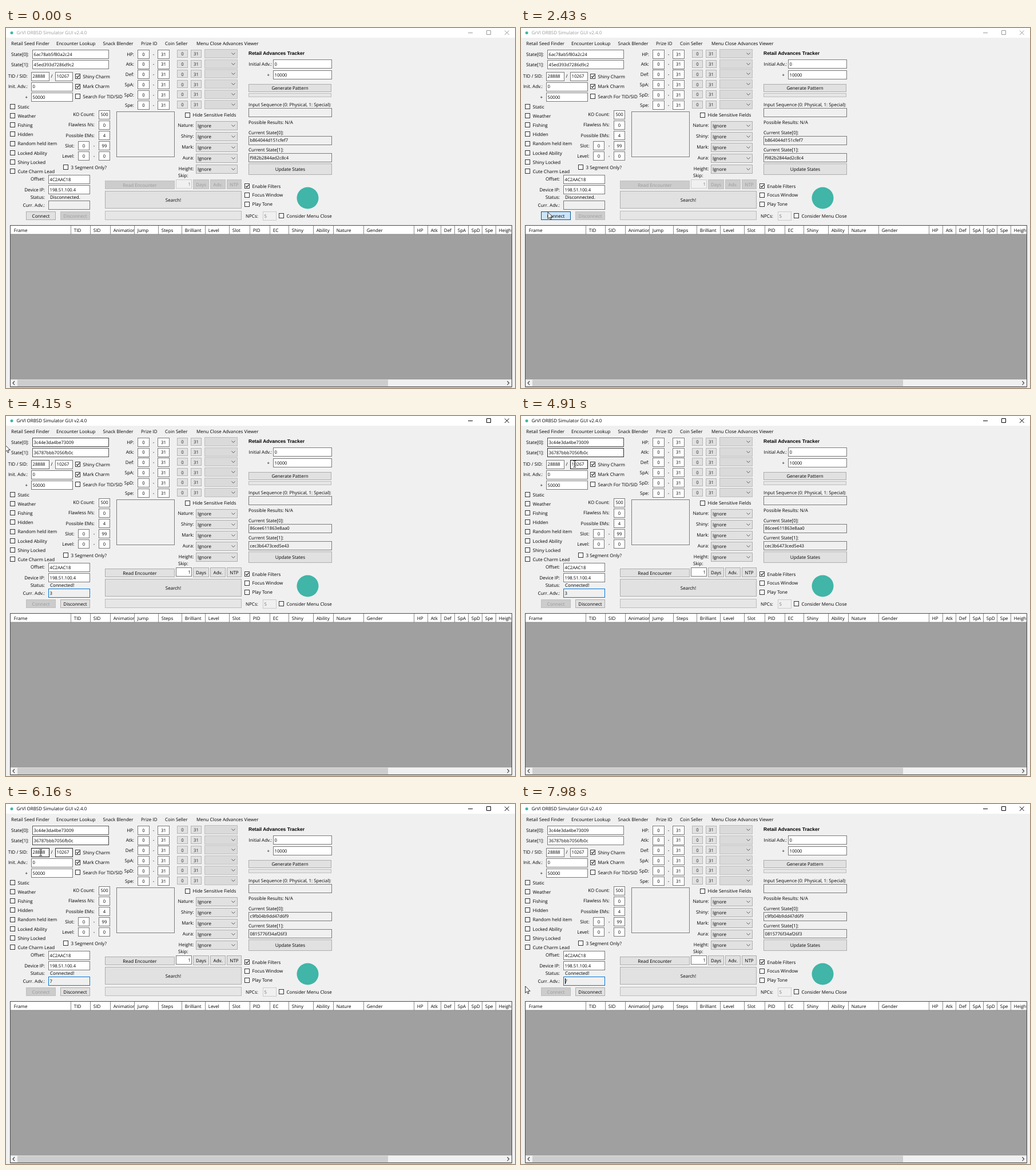
An HTML page that plays this animation: 890x630 px, repeating every 8 s.

```html
<!DOCTYPE html>
<html lang="en">
<head>
<meta charset="utf-8">
<title>Generator window</title>
<style>
  html, body { margin: 0; width: 100%; height: 100%; overflow: hidden; background: #f0f0f0; }
  svg { display: block; width: 890px; height: 630px; }
  text { font: 8px "Open Sans", "Noto Sans", sans-serif; text-rendering: geometricPrecision; white-space: pre; }
  .value { font-size: 7.7px; }
  .heading { font: bold 8.5px "Liberation Sans", sans-serif; }
</style>
</head>
<body>
<svg id="stage" viewBox="0 0 890 630"></svg>
<script>
const LOOP = 8000;
const PRESS = 2425, ACTIVE = 2460, LINKED = 2730;
const stage = document.getElementById('stage');
const hot = [];       // areas that react to the pointer
const editable = [];  // areas that show the I-beam
let layer = stage;

function add(tag, attrs, content) {
  const el = document.createElementNS('http://www.w3.org/2000/svg', tag);
  for (const key in attrs) el.setAttribute(key, attrs[key]);
  if (content !== undefined) el.textContent = content;
  layer.appendChild(el);
  return el;
}

function group(build) {
  const parent = layer, g = add('g', {});
  layer = g;
  build();
  layer = parent;
  return g;
}

const show = (el, on) => el.setAttribute('visibility', on ? 'visible' : 'hidden');

function text(x, cy, str, anchor = 'start', fill = '#000', cls = '') {
  return add('text', { x, y: cy + 2.8, 'text-anchor': anchor, fill, class: cls }, str);
}

function rect(x, y, w, h, fill, stroke) {
  return add('rect', { x: x + .5, y: y + .5, width: w, height: h, fill, stroke });
}

const fill = (x, y, width, height, color) => add('rect', { x, y, width, height, fill: color });

function hover(el, x, y, w, h, fade) {
  el.setAttribute('opacity', 0);
  hot.push({ el, x, y, w, h, fade });
}

function field(x, cy, w, str, { align = 'start', bg = '#fff' } = {}) {
  const y = Math.round(cy - 8);
  rect(x, y, w, 15, bg, '#7a7a7a');
  hover(rect(x, y, w, 15, 'none', '#171717'), x, y, w, 16, 350);
  editable.push({ x, y, w, h: 16 });
  const tx = align === 'middle' ? x + w / 2 + .5 : x + 2.5;
  return text(tx, cy, str, align, '#000', 'value');
}

function button(x, y, w, h, label, on = true) {
  rect(x, y, w, h, on ? '#e1e1e1' : '#cccccc', on ? '#adadad' : '#bfbfbf');
  if (on) hover(rect(x, y, w, h, '#e5f1fb', '#0078d7'), x, y, w, h, 150);
  text(x + w / 2 + .5, y + h / 2 + .7, label, 'middle', on ? '#000' : '#9a9a9a');
}

function check(x, cy, label, on) {
  rect(x, Math.round(cy - 5), 8, 8, '#fff', '#333');
  if (on) add('path', { d: `M${x + 2} ${cy - .5}l2 2.2 3.4-4.4`, fill: 'none', stroke: '#111', 'stroke-width': 1.1 });
  text(x + 13.5, cy, label);
}

function combo(x, y, w, label = '') {
  rect(x, y, w, 15, label ? '#e1e1e1' : '#dadada', label ? '#adadad' : '#bfbfbf');
  text(x + 3, y + 8, label);
  add('path', { d: `M${x + w - 9.5} ${y + 6.5}l3 3 3-3`, fill: 'none', stroke: '#555', 'stroke-width': 1 });
}

function tools(on) {
  button(173, 267, 121, 14, 'Read Encounter', on);
  rect(297, 265, 27, 15, on ? '#fff' : '#f0f0f0', on ? '#7a7a7a' : '#cccccc');
  text(323, 273, '1', 'end', on ? '#000' : '#777', 'value');
  [[327, 27, 'Days'], [357, 26, 'Adv.'], [386, 25, 'NTP']]
    .forEach(([x, w, label]) => button(x, 265, w, 16, label, on));
  button(35, 321, 51, 14, 'Connect', !on);
  button(95, 321, 51, 14, 'Disconnect', on);
}

// Title bar and menu
fill(0, 0, 890, 630, '#f0f0f0');
fill(0, 0, 890, 17, '#fff');
add('circle', { cx: 10, cy: 8.5, r: 2.5, fill: '#40b5a8' });
const caption = group(() => {
  add('text', { x: 18.5, y: 11.2 }, 'GrVl ORBSD Simulator GUI v2.4.0');
  add('path', { d: 'M808 8.5h8M840.5 4.5h7v7h-7zM872 4.5l7.5 7.5M879.5 4.5l-7.5 7.5', fill: 'none', stroke: 'currentColor' });
});
caption.setAttribute('fill', 'currentColor');
hover(rect(3, 20, 76, 15, '#b3d7f3', '#0078d7'), 3, 20, 77, 16, 50);
[[9, 'Retail Seed Finder'], [88, 'Encounter Lookup'], [169.5, 'Snack Blender'], [236, 'Prize ID'],
 [278, 'Coin Seller'], [333, 'Menu Close Advances Viewer']].forEach(([x, label]) => text(x, 27.5, label));

// Seed and trainer fields
text(40, 46, 'State[0]:', 'end');
text(40, 64, 'State[1]:', 'end');
text(38, 84.5, 'TID / SID:', 'end');
text(38, 102.5, 'Init. Adv.:', 'end');
text(38, 121, '+', 'end');
const state0 = field(46, 46, 133, '');
const state1 = field(46, 64, 133, '');
field(44, 84.5, 31, '28888');
text(80, 84.5, '/', 'middle');
field(86, 84.5, 30, '10267');
field(44, 102.5, 72, '0');
field(44, 121, 72, '50000');
check(121, 85, 'Shiny Charm', true);
check(121, 102.5, 'Mark Charm', true);
check(121, 120, 'Search For TID/SID');
['Static', 'Weather', 'Fishing', 'Hidden', 'Random held item', 'Locked Ability', 'Shiny Locked', 'Cute Charm Lead']
  .forEach((label, i) => check(7, 138 + i * 16.15, label));

// Encounter numbers
[['KO Count:', 500], ['Flawless IVs:', 0], ['Possible EMs:', 4]].forEach(([label, n], i) => {
  text(155, 151 + i * 18.4, label, 'end');
  field(162, 151.5 + i * 18.2, 19, n, { align: 'middle' });
});
[['Slot:', 0, 99], ['Level:', 0, 0]].forEach(([label, a, b], i) => {
  const cy = 206 + i * 18;
  text(119.5, cy, label, 'end');
  field(126, cy, 19, a, { align: 'middle' });
  text(154, cy, '-', 'middle');
  field(162, cy, 19, b, { align: 'middle' });
});
check(100, 244, '3 Segment Only?');
rect(193, 146, 101, 79, '#f0f0f0', '#7d7d7d');

// Filters
['HP:', 'Atk:', 'Def:', 'SpA:', 'SpD:', 'Spe:'].forEach((label, i) => {
  const cy = 45.7 + i * 17.8;
  text(224, cy, label, 'end');
  field(230, cy, 20, 0, { align: 'middle' });
  text(258, cy, '-', 'middle');
  field(265, cy, 20, 31, { align: 'middle' });
  [[299, 0], [323, 31]].forEach(([x, n]) => {
    rect(x, Math.round(cy - 8), 18, 13, '#e1e1e1', '#b5b5b5');
    text(x + 9.5, cy - .3, n, 'middle', '#222', 'value');
  });
  combo(347, Math.round(cy - 9), 57);
});
check(313, 152.5, 'Hide Sensitive Fields');
['Nature:', 'Shiny:', 'Mark:', 'Aura:', 'Height:'].forEach((label, i) => {
  text(328.5, 170.5 + i * 18.9, label, 'end');
  combo(332, 163 + i * 19, 72, 'Ignore');
});
text(301, 257.7, 'Skip:');

// Connection
text(68, 264.5, 'Offset:', 'end');
field(74, 265, 72, '4C2AAC18');
text(68, 283, 'Device IP:', 'end');
field(74, 283, 72, '198.51.100.4');
text(68, 296.5, 'Status:', 'end');
const status = text(77, 296.5, '');
text(68, 310, 'Curr. Adv.:', 'end');
const advance = field(74, 310, 72, '', { bg: '#f0f0f0' });

let pressed;
const offline = group(() => {
  tools(false);
  pressed = group(() => {
    rect(35, 321, 51, 14, '#cce4f7', '#005499');
    text(61, 328.7, 'Connect', 'middle');
  });
});
const online = group(() => {
  tools(true);
  rect(74, 302, 72, 15, 'none', '#0078d7');
});
const caret = fill(77, 305, 1, 10, '#000');
button(173, 285, 238, 30, 'Search!');
rect(173, 320, 238, 15, '#e6e6e6', '#bcbcbc');

// Tracker
text(424, 44, 'Retail Advances Tracker', 'start', '#000', 'heading');
text(465, 63, 'Initial Adv.:', 'end');
field(467, 63, 102, '0');
text(461, 82, '+', 'end');
field(467, 82, 102, '10000');
button(424, 98, 144, 13, 'Generate Pattern');
rect(424, 114, 144, 6, '#e6e6e6', '#bcbcbc');
text(424, 134, 'Input Sequence (0: Physical, 1: Special):');
field(424, 148, 145, '', { bg: '#f0f0f0' });
text(424, 165, 'Possible Results: N/A');
text(424, 183, 'Current State[0]:');
const current0 = field(424, 196.5, 145, '', { bg: '#f0f0f0' });
text(424, 213, 'Current State[1]:');
const current1 = field(424, 227, 145, '', { bg: '#f0f0f0' });
button(424, 237, 145, 19, 'Update States');
check(417, 277, 'Enable Filters', true);
check(417, 292.5, 'Focus Window');
check(417, 308.5, 'Play Tone');
text(419, 329, 'NPCs:');
rect(449, 321, 23, 15, '#f0f0f0', '#cccccc');
text(451.5, 329, '5', 'start', '#6d6d6d', 'value');
check(477, 329, 'Consider Menu Close');
add('circle', { cx: 527.5, cy: 297.5, r: 19, fill: '#40b5a8' });

// Result table
fill(7, 345, 878, 284, '#a0a0a0');
const columns = [['Frame', 8], ['TID', 113], ['SID', 147], ['Animation', 182], ['Jump', 224], ['Steps', 266],
  ['Brilliant', 307], ['Level', 348], ['Slot', 390], ['PID', 426], ['EC', 461], ['Shiny', 494], ['Ability', 537],
  ['Nature', 572], ['Gender', 625], ['HP', 713], ['Atk', 737], ['Def', 760], ['SpA', 784], ['SpD', 808],
  ['Spe', 832], ['Height', 856]];
columns.forEach(([label, x], i) => {
  const w = (i + 1 < columns.length ? columns[i + 1][1] : 884) - x;
  fill(x, 346, w + 30, 15, '#fff');
  hover(fill(x, 346, w, 15, '#d9ebf9'), x, 346, w, 15, 250);
  if (i) fill(x, 346, 1, 15, '#8c8c8c');
  text(x + 5.8, 353.7, label);
});
fill(884, 345, 6, 285, '#f0f0f0');
fill(8, 360.5, 876, 1, '#8c8c8c');
fill(8, 615, 876, 12.5, '#f0f0f0');
fill(20, 615.5, 648, 12, '#cdcdcd');
add('path', { d: 'M15 618l-3 3.3 3 3.3M876.5 618l3 3.3-3 3.3', fill: 'none', stroke: '#444', 'stroke-width': 1.2 });
rect(7, 345, 877, 282.5, 'none', '#4a4a4a');

// Pointer
const arrow = add('path', {
  d: 'M0 0V11.8L2.7 9.2 4.4 13.2 6.2 12.4 4.6 8.5H8.4Z', fill: '#fff', stroke: '#000', 'stroke-width': .8
});
const beam = add('path', {
  d: 'M-2.5-5.5h2l.5.5.5-.5h2M0-5V5M-2.5 5.5h2l.5-.5.5.5h2', fill: 'none', stroke: '#000', 'stroke-width': .9
});

const path = [
  [630, 824, 624], [830, 690, 560], [1100, 320, 425], [1300, 128, 357], [1430, 72, 345], [1460, 68, 342],
  [1670, 47, 322], [1700, 47, 322], [3400, 47, 322], [3430, 47, 320], [3700, 52, 190], [3950, 70, 45],
  [4040, 40, 42], [4150, -1, 51], [4240, 4, 45], [4450, 40, 27], [4650, 82, 36], [4780, 100, 58],
  [4910, 94, 84], [5040, 80, 72], [5150, 60, 60], [5300, 20, 40], [5450, 12, 23], [5650, 58, 20],
  [5850, 120, 46], [5980, 125, 63], [6080, 98, 83], [6160, 61, 85], [6400, 20, 100], [6600, 10, 116],
  [6730, 30, 125], [7000, 18, 200], [7330, 63, 277], [7530, 166, 302], [7600, 182, 305], [7700, 173, 325],
  [7850, 80, 338], [7980, 8, 319], [8000, 8, 319]
];

function slope(i, axis) {
  const a = path[Math.max(i - 1, 0)], b = path[Math.min(i + 1, path.length - 1)];
  return (b[axis] - a[axis]) / (b[0] - a[0]);
}

// Hermite curve through the path points
function pointer(t) {
  if (t < path[0][0]) return null;
  const i = Math.max(path.findIndex(p => p[0] > t) - 1, 0);
  const a = path[i], b = path[i + 1], dt = b[0] - a[0], u = (t - a[0]) / dt, v = 1 - u;
  return [1, 2].map(k =>
    a[k] * (1 + 2 * u) * v * v + b[k] * u * u * (3 - 2 * u) +
    dt * u * v * (slope(i, k) * v - slope(i + 1, k) * u));
}

const inside = (p, r) => p && p[0] >= r.x && p[0] < r.x + r.w && p[1] >= r.y && p[1] < r.y + r.h;

// Columns: time, seed pair, current pair, status, advances
const seed = ['3c44e3da4be73009', '36787bbb7056fb0c'];
const slots = [state0, state1, current0, current1, status, advance];
const steps = [
  [0, '6ac78ab5f80a2c24', '45ed393d7286d9c2', 'b864044d151cfef7', 'f982b2844ad2c8c4', 'Disconnected.', ''],
  [LINKED, ...seed, ...seed, 'Connected!', '0'],
  [3120, ...seed, '72bc98613b9dcb05', '51f0ad3c98e27b46', 'Connected!', '1'],
  [3960, ...seed, '86cee611863e8aa0', 'cec3b6473ced5e43', 'Connected!', '3'],
  [5000, ...seed, 'c9fb04b9dd47d6f9', '0815776f34af26f3', 'Connected!', '7']
];
let shown;

function render(t) {
  const step = steps.filter(s => s[0] <= t).pop();
  if (step !== shown) slots.forEach((el, i) => { el.textContent = step[i + 1]; });
  shown = step;

  caption.setAttribute('color', t < ACTIVE ? '#999' : '#000');
  offline.style.display = t < LINKED ? '' : 'none';
  online.style.display = t < LINKED ? 'none' : '';
  show(pressed, t >= PRESS && t < LINKED);
  show(caret, t > 4000 && (t - 3270) % 1060 < 530);

  // A hovered area fades out after the pointer has left it
  const trail = Array.from({ length: 15 }, (_, i) => pointer(t - i * 25));
  for (const h of hot) {
    const k = trail.findIndex(p => inside(p, h));
    h.el.setAttribute('opacity', k < 0 ? 0 : Math.max(0, 1 - k * 25 / h.fade));
  }

  const p = trail[0], typing = editable.some(r => inside(p, r));
  show(arrow, p && !typing);
  show(beam, p && typing);
  if (p) [arrow, beam].forEach(el => el.setAttribute('transform', `translate(${p[0]} ${p[1]})`));
}

function tick() {
  render(performance.now() % LOOP);
  requestAnimationFrame(tick);
}
tick();
</script>
</body>
</html>
```
